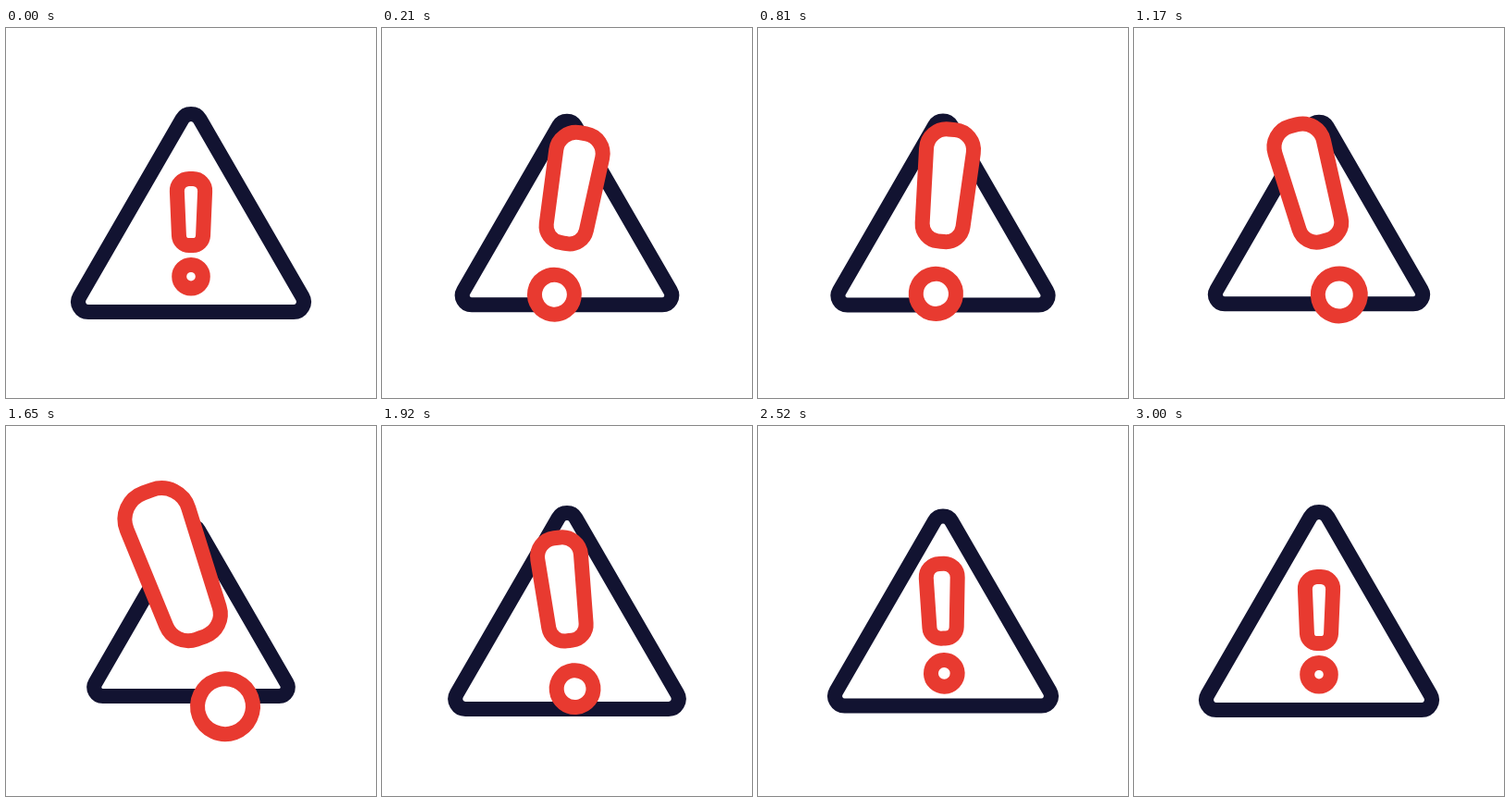
Animation, 400 px wide and 400 px high, one loop 3060 ms. Source, as an HTML page with a canvas:

```html
<!DOCTYPE html>
<html lang="en">
<head>
<meta charset="utf-8">
<title>Warning</title>
<style>
  html, body { margin: 0; width: 100%; height: 100%; overflow: hidden; background: #fff; }
  canvas { display: block; }
</style>
</head>
<body>
<canvas id="stage" width="400" height="400"></canvas>
<script>
const ctx = document.getElementById('stage').getContext('2d');
const LOOP = 3060, STEP = 30, END = 3000;
const NAVY = '#121331', RED = '#e83a30';
const TIMES = [0, 420, 930, 1620, 2220, 2550, END];
const TURNS = [0, 420, 1380, 1620, 2220, 2550, END];

const smooth = x => x * x * (3 - 2 * x);

function tween(t, times, values) {
  const i = Math.max(1, times.findIndex(time => time >= t));
  const x = (t - times[i - 1]) / (times[i] - times[i - 1]);
  return values[i - 1] + (values[i] - values[i - 1]) * smooth(x);
}

// Two swells with a dip between, then overshoot, rebound and rest
const swell = (t, rest, peak, dip, over, back) =>
  tween(t, TIMES, [rest, peak, dip, peak, over, back, rest]);

const swing = (t, angle) =>
  tween(t, TURNS, [0, 1, -1, -1, 0.32, -0.08, 0]) * angle * Math.PI / 180;

// Mirrored shape with flat top and bottom, given by half widths and corner radii
function taper(top, topHalf, topRadius, bottom, bottomHalf, bottomRadius) {
  ctx.moveTo(0, bottom);
  ctx.arcTo(-bottomHalf, bottom, -topHalf, top, bottomRadius);
  ctx.arcTo(-topHalf, top, topHalf, top, topRadius);
  ctx.arcTo(topHalf, top, bottomHalf, bottom, topRadius);
  ctx.arcTo(bottomHalf, bottom, 0, bottom, bottomRadius);
  ctx.closePath();
}

function triangle() {
  ctx.moveTo(0, 107);
  ctx.arcTo(-130, 107, 0, -118, 11);
  ctx.arcTo(0, -118, 130, 107, 11);
  ctx.arcTo(130, 107, 0, 107, 11);
  ctx.closePath();
}

const bar = () => taper(-59, 15.7, 13, 13, 12.6, 11);
const dot = () => ctx.arc(0, 46.7, 12.8, 0, 2 * Math.PI);

// Shape is scaled, line weight is not
function outline(shape, color, y, scale, angle) {
  ctx.save();
  ctx.translate(200, y);
  ctx.rotate(angle);
  ctx.scale(scale, scale);
  ctx.beginPath();
  shape();
  ctx.restore();
  ctx.fillStyle = '#fff';
  ctx.fill();
  ctx.strokeStyle = color;
  ctx.lineWidth = 16;
  ctx.stroke();
}

function draw(t) {
  ctx.fillStyle = '#fff';
  ctx.fillRect(0, 0, 400, 400);
  outline(triangle, NAVY, 200, swell(t, 1, 0.857, 0.943, 1.123, 0.955), 0);
  const y = swell(t, 222, 200.3, 210.3, 223.6, 214.8);
  const scale = swell(t, 1, 2.35, 1.58, 0.76, 1.13);
  for (const part of [bar, dot]) outline(part, RED, y, scale, swing(t, 20));
}

function tick() {
  const t = performance.now() % LOOP;
  draw(Math.min(END, Math.floor(t / STEP) * STEP));
  requestAnimationFrame(tick);
}
tick();
</script>
</body>
</html>
```
